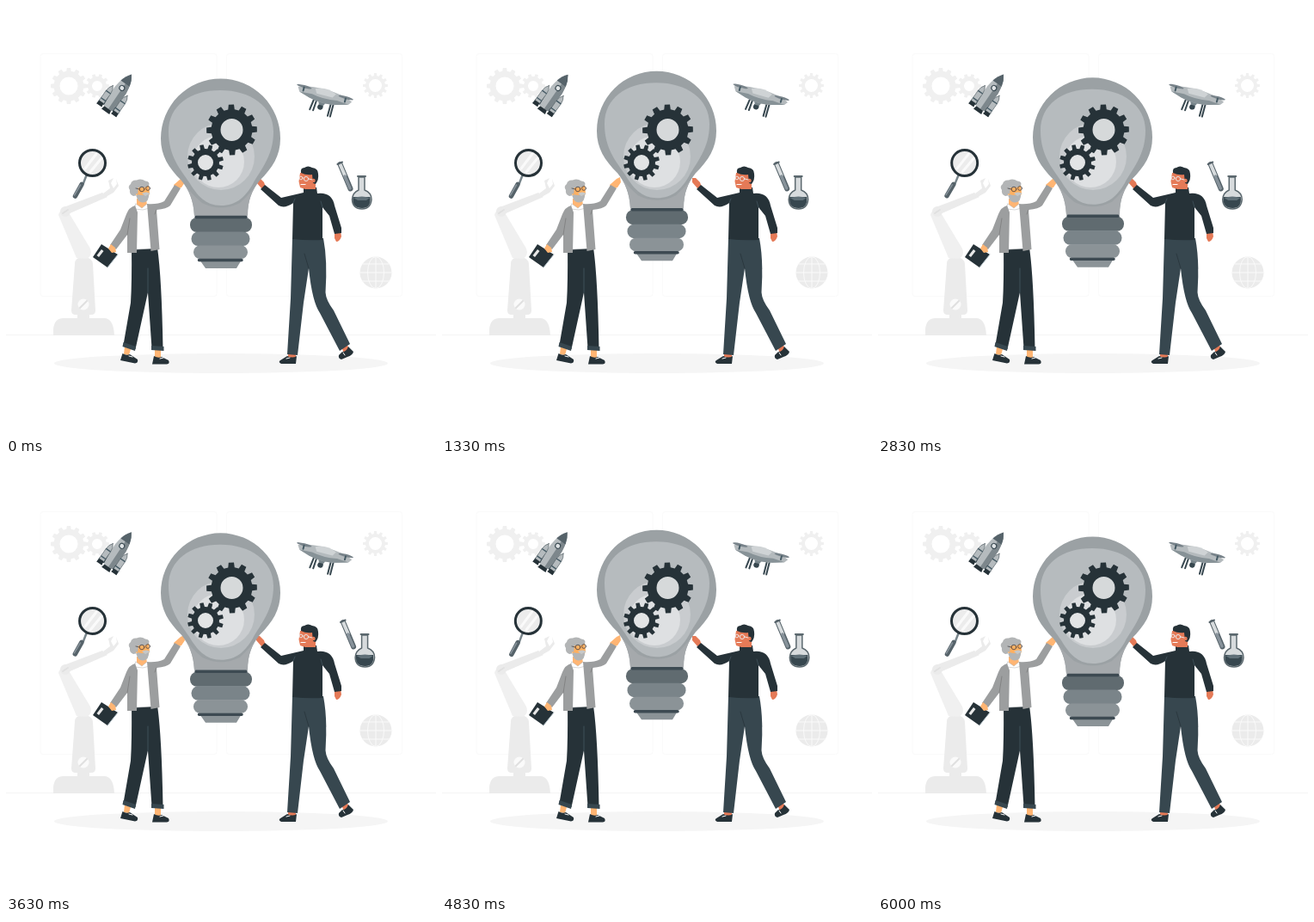
An HTML page that plays this animation: 500x500 px, repeating every 6040 ms.

```html
<!DOCTYPE html>
<html lang="en">
<head>
<meta charset="utf-8">
<title>Big idea</title>
<style>
html, body { margin: 0; width: 100%; height: 100%; overflow: hidden; background: #fff; }
svg { display: block; width: 100vw; height: 100vh; }
</style>
</head>
<body>
<svg viewBox="0 0 500 500" fill="none" stroke-linecap="round" stroke-linejoin="round">
  <!-- backdrop -->
  <g stroke="#fafafa">
    <rect x="40" y="55.500" width="205" height="282" rx="3"/>
    <rect x="256.500" y="55.500" width="204" height="282" rx="3"/>
    <path d="M0 382.500H500" stroke="#f4f4f4"/>
  </g>
  <g id="paleGears" fill="#f0f0f0" fill-rule="evenodd"></g>
  <circle cx="430" cy="310" r="18.500" fill="#ebebeb"/>
  <g stroke="#fafafa">
    <path d="M430 291V329M411 310H449M414 300H446M414 320H446"/>
    <ellipse cx="430" cy="310" rx="9.500" ry="18.500"/>
  </g>

  <!-- robot arm -->
  <g fill="#ebebeb">
    <path d="M55 383V376Q56 363 67 363H114Q125 363 126 383ZM83 357H97V364H83Z"/>
    <path d="M80 300Q80 292 90 292Q100 292 101 300L104 354Q104 359 99 359H81Q76 359 76 354Z"/>
    <path d="M61 243Q62 236 71 237L98 282Q101 290 94 294L82 293Z" fill="#f0f0f0"/>
    <path d="M67 234L112 217L118 222L72 242Z"/>
    <circle cx="69" cy="239" r="6"/>
    <path d="M113 218L121 212L119 203L125 200L122 206L125 212L129 207L128 201L131 209L125 217L116 222Z"/>
  </g>
  <circle cx="90" cy="347" r="6.500" fill="#fafafa"/>
  <path d="M86 351L94 343M66 241L72 237" stroke="#e0e0e0" stroke-width="2"/>

  <ellipse cx="250" cy="415.500" rx="194" ry="11.500" fill="#f5f5f5"/>

  <!-- older man -->
  <g>
    <path d="M138 396L145 399L143 406L137 405ZM173 400H180V409H173Z" fill="#ffb573"/>
    <path d="M135.500 404Q140 407 144 405L153 411Q154 415 150 415.500L133 412ZM172 407Q177 410 181 408L189 412Q191 416 187 416.500H170Z" fill="#263238"/>
    <path d="M143 407L147 408M179 410L183 409" stroke="#fff"/>
    <path d="M146 281H176Q181 315 182.500 399L169.500 398L165 333L150.500 399L136.500 394L145 345Q146.500 320 146 281Z" fill="#263238"/>
    <path d="M165 305L165 333" stroke="#455a64" stroke-width=".8"/>
    <path d="M136.500 391L151 396L150 401L135.500 396ZM169 395L183.500 396V401L169 400Z" fill="#37474f"/>
    <path d="M203 201L207 199L208 205L204 211L198 213L195 208Z" fill="#ffb573"/>
    <path d="M150 235L166 231L172 240L170 282L151 283Z" fill="#fff" stroke="#eee" stroke-width=".5"/>
    <path d="M152 224H163L164 232L158 236L152 232Z" fill="#ffb573"/>
    <path d="M151 230L158 235L164 230L167 235L159 237L150 236Z" fill="#fff" stroke="#b0b0b0" stroke-width=".5"/>
    <path d="M150 232Q143 234 140 242L133 260L121 278L128 283L141 266L141 287H152L153 240Z" fill="#9c9e9f"/>
    <path d="M141 266L144 247" stroke="#777" stroke-width=".7"/>
    <path d="M164 230Q176 231 184 227L196 208L203 212L191 232Q187 236 175 237L178.500 283L168.500 285Z" fill="#9c9e9f"/>
    <path d="M175 237L173 242" stroke="#777" stroke-width=".7"/>
    <path d="M152 207Q158 203 166 208L167 218Q165 225 158 226L151 219Z" fill="#ffb060"/>
    <path d="M166 209Q168 204 162 203.500Q157 200 152 202.500Q146 202 145 207Q141 210 144 214Q143 219 148 221L153 220L154 211Q161 212 166 209ZM151 218Q158 222 166 218Q167 228 159 228.500Q152 228 151 218Z" fill="#b3b5b6"/>
    <path d="M158 218Q163 215 168 218L162 221Z" fill="#c6c8c9"/>
    <g stroke="#4a4444" stroke-width=".8"><circle cx="158" cy="213" r="2.800"/><circle cx="165" cy="212" r="2.400"/><path d="M151 212L155 213"/></g>
    <path d="M111 277L130 289L118 304L101 292Z" fill="#263238"/>
    <path d="M130 289L118 304" stroke="#b0bec5"/>
    <path d="M111 283L113.500 285L108 292L105.500 290Z" fill="#e8e8e8"/>
    <path d="M122 277L127 281L128 286L123 287L119 282Z" fill="#ffb573"/>
  </g>

  <!-- younger man -->
  <g>
    <path d="M328 402H337V411H328ZM390 396L396 393L400 400L393 404Z" fill="#e57a57"/>
    <path d="M327 407Q333 410 338 407L337 416H320Q316 414 319 412ZM398 396L404 402Q403 406 397 408L390 411Q386 410 387 406L391 402Q396 402 398 396Z" fill="#263238"/>
    <path d="M326 410L330 409M392 403L394 406" stroke="#fff"/>
    <path d="M333 270H369Q374 296 371.500 333Q372 342 381 354L400 393L388 401L365 357Q356 344 352 305L346 345L339 406L327 405L331 340Z" fill="#37474f"/>
    <path d="M352 305L347 288" stroke="#263238" stroke-width=".7"/>
    <path d="M300 205L295 200L291 200L291 205L297 212L302 211Z" fill="#e57a57"/>
    <path d="M382 262H389L390 268Q388 274 384 274L382 270Z" fill="#e57a57"/>
    <path d="M346 211H361L362 218Q379 216 382 232L390 258L390 264L382 265L376 244L368 234V272Q350 273 333 271L334 229Q324 236 317 232L296 213L301 208L320 223L346 217Z" fill="#263238"/>
    <path d="M368 234L366 227M334 229L336 224" stroke="#455a64" stroke-width=".7"/>
    <path d="M342 194H358L360 204V213H348L342 211L340.500 204Z" fill="#e57a57"/>
    <path d="M343 194Q342 188 347 188Q351 185 356 188Q363 189 363 195Q364 202 360 207L357 206L356 196Q349 197 343 194Z" fill="#263238"/>
    <circle cx="357.500" cy="203" r="2.200" fill="#e57a57"/>
    <path d="M343 207.500L348 207.500" stroke="#fff" stroke-width="1.200"/>
    <g stroke="#eceff1" stroke-width=".9"><circle cx="349" cy="201" r="2.600"/><circle cx="343" cy="200" r="1.900"/><path d="M352 201L356 202"/></g>
  </g>

  <!-- bulb -->
  <g id="bulb">
    <path d="M219 244C218 226 213 214 204 203C189 188 180 174 180 154A69.500 69.500 0 0 1 319 154C319 174 310 188 295 203C286 214 281 226 281 244Z" fill="#9ba1a4"/>
    <path d="M219 244C218 226 213 214 204 203Q215 218 228 229Q250 240 272 229Q285 217 295 203C286 214 281 226 281 244Z" fill="#a5a9ac"/>
    <path d="M250 232C232 232 222 220 213 205C203 190 189 175 189 146C189 116 214 98 249 98C285 98 311 117 311 146C311 175 296 190 287 207C278 222 268 232 250 232Z" fill="#b6bbbe"/>
    <rect x="214" y="246" width="72" height="17" rx="8" fill="#606b70"/>
    <rect x="215.500" y="262.500" width="68" height="16.500" rx="8" fill="#7a8489"/>
    <rect x="218" y="278.500" width="63" height="15.500" rx="7.500" fill="#8b9397"/>
    <path d="M225 295H274L268 305H232Z" fill="#8b9397"/>
    <path d="M221 245.500H279M224.500 295.500H274" stroke="#3d4a52" stroke-width="3.500"/>
  </g>
  <circle cx="250" cy="175" r="39" fill="#fff" opacity=".25"/>
  <circle cx="247" cy="181" r="30" fill="#fff" opacity=".38"/>
  <circle cx="262.500" cy="144" r="15" fill="#d6d9da"/>
  <circle cx="232" cy="182" r="11" fill="#e2e4e5"/>
  <g id="gears" fill="#263238" fill-rule="evenodd"></g>

  <!-- rocket -->
  <g id="rocket"><g transform="translate(129.500 103) rotate(35) scale(.93)">
    <path d="M-7 6L-15 18V24L-6 20ZM7 6L15 18V24L6 20Z" fill="#37474f"/>
    <path d="M0 -31Q10 -16 8 2L6 21H-6L-8 2Q-10 -16 0 -31Z" fill="#b5bbbe"/>
    <path d="M0 -31Q10 -16 8 2L6 21H1Z" fill="#7d878c"/>
    <path d="M0 -31Q5 -25 6.800 -17H-6.800Q-5 -25 0 -31Z" fill="#56636a"/>
    <path id="booster" d="M-11 -6Q-7.500 -2 -7.500 4V19H-14.500V4Q-14.500 -2 -11 -6Z" fill="#b5bbbe" stroke="#5d686d" stroke-width=".7"/>
    <use href="#booster" x="22"/>
    <path d="M-14 4H-8M8 4H14M-14 15H-8M8 15H14" stroke="#455a64" stroke-width="1.500"/>
    <path d="M-14 19H-8L-7 24H-15ZM8 19H14L15 24H7ZM-5 21H5L6 26H-6Z" fill="#263238"/>
    <circle cy="-10" r="3.200" fill="#dfe3e5" stroke="#37474f" stroke-width="1.200"/>
  </g></g>

  <!-- drone -->
  <g id="drone"><g transform="translate(370 104) rotate(15)">
    <path d="M-10 5L-12 20M-7 6L-8 20M10 5V22M13 5V22" stroke="#37474f" stroke-width="2"/>
    <circle cx="-1" cy="14" r="3.300" fill="#37474f"/>
    <path d="M-5 8H4L2 12H-3Z" fill="#78858b"/>
    <path d="M-32 -2Q-20 -7 0 -7Q22 -7 33 -1L30 3L16 7Q0 11 -16 7L-29 3Z" fill="#b4babd"/>
    <path d="M-29 3L-14 2Q0 5 16 2L30 3L16 7Q0 11 -16 7Z" fill="#87929 7"/>
    <path d="M-29 3L-14 2Q0 5 16 2L30 3L16 7Q0 11 -16 7Z" fill="#879297"/>
    <path d="M-12 -5Q0 -11 13 -5L10 0H-9Z" fill="#cfd3d5"/>
    <g fill="#78838a"><ellipse cx="-25" cy="-4" rx="9" ry="1.600"/><ellipse cx="25" cy="-4" rx="9" ry="1.600"/></g>
    <path d="M-25 -3V1M25 -3V1" stroke="#455a64" stroke-width="2"/>
  </g></g>

  <!-- magnifier -->
  <g id="lens">
    <path d="M93.500 197L90 206" stroke="#78858b" stroke-width="2.500"/>
    <path d="M88 207.500L80.500 221" stroke="#56636a" stroke-width="5.500"/>
    <path d="M86.500 208L79.500 220" stroke="#87929a" stroke-width="1.500"/>
    <circle cx="100.500" cy="182.500" r="15" fill="#ececec" stroke="#263238" stroke-width="3"/>
    <path d="M92 189L105 172M98 193L111 177" stroke="#fafafa" stroke-width="3"/>
  </g>

  <!-- glassware -->
  <g id="glass">
    <path d="M388.500 184L400.500 212.500" stroke="#56636a" stroke-width="6"/>
    <path d="M388.500 184L394 197" stroke="#d7dbdd" stroke-width="4"/>
    <path d="M394 198L400 212" stroke="#87929a" stroke-width="3.500"/>
    <path d="M385.500 184L391 181.500" stroke="#56636a" stroke-width="2"/>
    <path d="M410 199H417V214Q425 217 425 225Q424 236 414 236Q403 236 402.500 225Q403 217 410 214Z" fill="#d7dbdd" stroke="#5b686e" stroke-width="1.500"/>
    <path d="M403.500 222H423.500Q425 235 414 235Q402 235 403.500 222Z" fill="#37474f"/>
    <path d="M404 223Q414 220 423 223L419 226H409Z" fill="#607078"/>
    <path d="M409 198H418" stroke="#5b686e" stroke-width="2"/>
  </g>
</svg>
<script>
const $ = id => document.getElementById(id);

function gear(x, y, outer, root, hole, teeth, turn = 0) {
  const step = 2 * Math.PI / teeth, pts = [];
  for (let i = 0; i < teeth; i++)
    for (const [r, k] of [[root, -.3], [outer, -.2], [outer, .2], [root, .3]]) {
      const a = (i + k) * step + turn;
      pts.push((x + r * Math.cos(a)).toFixed(2) + ' ' + (y + r * Math.sin(a)).toFixed(2));
    }
  const arc = `a${hole} ${hole} 0 1 0 `;
  return `<path d="M${pts.join('L')}ZM${x - hole} ${y}${arc}${2 * hole} 0${arc}${-2 * hole} 0Z"/>`;
}

$('paleGears').innerHTML = gear(73, 93, 21, 17.5, 10.5, 12) + gear(106, 93, 14, 11, 6, 10) + gear(429.5, 92.5, 14.5, 11.5, 7.5, 12);
$('gears').innerHTML = gear(262.5, 144, 29.5, 24, 13, 12, -.02) + gear(232, 182, 21, 16, 9, 12, .3);

// Linear interpolation through evenly spaced values, p in 0..1
function through(values, p) {
  const s = p * (values.length - 1), i = Math.min(Math.floor(s), values.length - 2);
  return values[i] + (values[i + 1] - values[i]) * (s - i);
}

const LOOP = 6040, CYCLE = 6000, LENS_START = 1900;
const SHAKE = [0, -1, 2, -4, 4, -4, 4, -4, 2, -1, 0];
const SWAY = [0, 1, 0, -1, 0];
const move = (id, x, y) => $(id).setAttribute('transform', `translate(${x} ${y})`);
const spin = (id, a, x, y) => $(id).setAttribute('transform', `rotate(${a} ${x} ${y})`);

function draw(now) {
  const t = Math.min(now % LOOP, CYCLE), p = t / CYCLE;
  const sway = through(SWAY, p);
  move('bulb', 0, through([0, -10, 0, -10, 0], p));
  move('glass', through(SHAKE, p), 0);
  spin('rocket', sway, 127, 104);
  spin('drone', sway, 370, 106);
  spin('lens', through(SWAY, Math.max(0, t - LENS_START) / (CYCLE - LENS_START)), 98, 195);
  requestAnimationFrame(draw);
}
draw(0);
</script>
</body>
</html>
```
